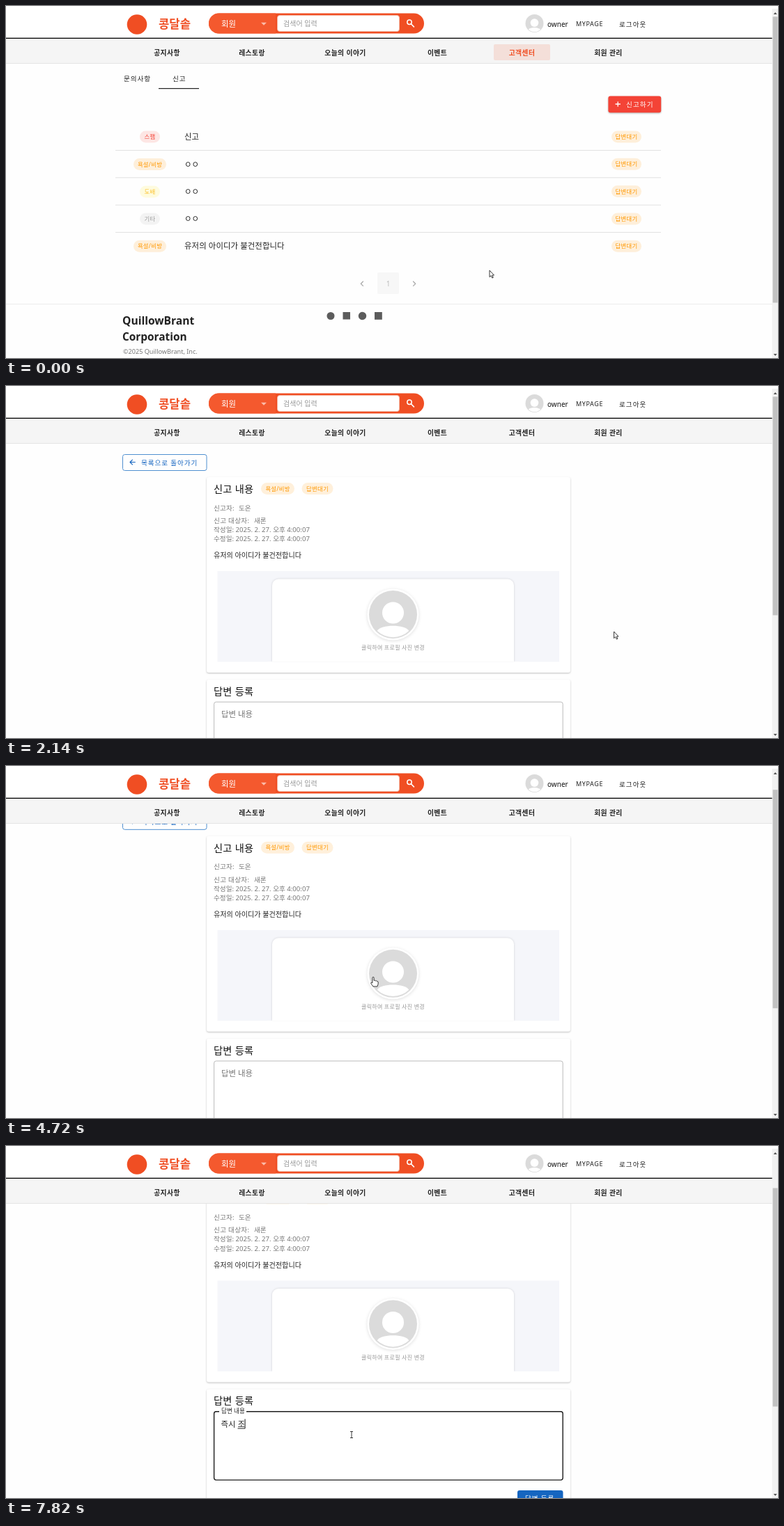
An HTML page that plays this animation: 1108 px wide and 506 px high, repeating every 8000 ms.

```html
<!DOCTYPE html>
<html lang="ko">
<head>
<meta charset="utf-8">
<title>신고 답변</title>
<style>
html, body { margin: 0; width: 100%; height: 100%; overflow: hidden; background: #fefefe; }
svg { display: block; width: 100vw; height: 100vh; }
text { font-family: "Noto Sans", "Noto Sans CJK KR", "Noto Sans CJK", sans-serif; white-space: pre; }
.b { font-weight: 700; }
.s { font-weight: 600; }
.m { font-weight: 500; }
.mid { text-anchor: middle; }
.card { fill: #fff; filter: drop-shadow(0 1px 1px rgba(0,0,0,.25)); }
.raised { filter: drop-shadow(0 1px 1.2px rgba(0,0,0,.3)); }
.line { fill: none; stroke-linecap: round; stroke-linejoin: round; }
</style>
</head>
<body>
<svg id="stage" viewBox="0 0 1108 506"></svg>
<script>
const ORANGE = '#f04e23', GREY = '#777', INK = '#222', BLUE = '#1565c0';
const LOOP = 8000, SCROLL = 72.5;

// Text is placed by its left edge and its optical middle.
const text = (x, cy, str, size, fill = INK, ls = 0, cls = '', id = '') =>
  `<text id="${id}" class="${cls}" x="${x}" y="${cy + size * .37}" font-size="${size}" fill="${fill}" letter-spacing="${ls}">${str}</text>`;
const rect = (x, y, w, h, fill, r = 0, more = '') =>
  `<rect x="${x}" y="${y}" width="${w}" height="${h}" rx="${r}" fill="${fill}" ${more}/>`;
const circle = (x, y, r, fill) => `<circle cx="${x}" cy="${y}" r="${r}" fill="${fill}"/>`;
const stroke = (d, color, w = 1.3) => `<path class="line" d="${d}" stroke="${color}" stroke-width="${w}"/>`;
const chip = (cx, cy, w, str, rgb, alpha, color) =>
  rect(cx - w / 2, cy - 8.5, w, 17, `rgba(${rgb},${alpha})`, 8.5) + text(cx, cy, str, 8.4, color, .25, 'mid');
const amber = (cx, cy, w, str) => chip(cx, cy, w, str, '255,152,0', .14, '#ff9800');
const avatar = (x, y, r) => `<g transform="translate(${x} ${y}) scale(${r})">${circle(0, 0, 1, '#dbdbdb')}
  ${circle(0, -.07, .45, '#fff')}<path fill="#fff" d="M-.66 .68C-.5 .4 .5 .4 .66 .68A.95 .95 0 0 1-.66 .68"/></g>`;

const nav = [[231, '공지사항'], [353, '레스토랑'], [487, '오늘의 이야기'], [619, '이벤트'], [740.5, '고객센터'], [864.5, '회원 관리']];
const navItem = ([x, str], color) => text(x, 67, str, 9.8, color, .4, 'b mid');

const header = () => rect(0, 0, 1100, 46, '#fff') + rect(0, 45.7, 1100, 1.4, '#000') +
  rect(0, 47, 1100, 35, '#f5f5f5') + rect(0, 82, 1100, 1, '#e4e4e4') +
  circle(188, 26.5, 14.3, ORANGE) + text(219, 25.5, '콩달솥', 16.7, ORANGE, 0, 'b') +
  rect(291, 10.5, 309, 29, ORANGE, 14.5) +
  '<path fill="#f4592e" d="M387 10.5H305.5a14.5 14.5 0 0 0 0 29H387Z"/>' +
  text(309, 25.5, '회원', 11.4, '#fff') + '<path fill="#fff" opacity=".6" d="M366 23.8h8l-4 4Z"/>' +
  rect(389.5, 13.5, 175, 23, '#fff', 3.5, 'stroke="#f3b9a6"') + text(398, 25.5, '검색어 입력', 10, '#999') +
  '<circle cx="579" cy="23.3" r="3.2" fill="none" stroke="#fff" stroke-width="1.5"/>' + stroke('M581.6 26l3.8 3.8', '#fff', 1.7) +
  avatar(758.5, 25, 13) + text(777, 26, 'owner', 10, '#111') +
  text(818, 26, 'MYPAGE', 9, INK, .6) + text(880, 26, '로그아웃', 9.5, INK, 1.1) +
  nav.map(n => navItem(n, INK)).join('') +
  `<g id="active">${rect(700, 55, 81, 23, '#f4dfd9', 2)}${navItem(nav[4], ORANGE)}</g>`;

const rows = [
  ['신고', chip(206.5, 188, 29, '스팸', '244,67,54', .13, '#f44336')],
  ['ㅇㅇ', amber(206.5, 227.5, 47, '욕설/비방')],
  ['ㅇㅇ', chip(206.5, 267, 29, '도배', '255,235,59', .16, '#fbc02d')],
  ['ㅇㅇ', chip(206.5, 306, 29, '기타', '0,0,0', .045, '#9e9e9e')],
  ['유저의 아이디가 불건전합니다', amber(206.5, 345.3, 47, '욕설/비방')]
];

const listPage = () => text(169, 104, '문의사항', 9.6, INK, .9) + text(239, 104, '신고', 9.6, INK, .9) +
  rect(219, 118, 58, 1.2, '#222') +
  rect(864.4, 129.4, 75.8, 23.8, '#f44336', 3, 'class="raised"') +
  stroke('M875 141h6.4M878.2 137.8v6.4', '#fff') + text(890, 141.5, '신고하기', 9.6, '#fff', 1.1) +
  rect(157, 325, 783, 39, '#ebebeb', 0, 'id="hover"') +
  rows.map(([title, tag], i) => {
    const y = 188 + i * 39.3;
    return tag + text(256, y, title, 11.4, INK, .1) + amber(890.5, y, 43, '답변대기') +
      (i < 4 ? rect(157, y + 19, 783, 1, '#e2e2e2') : '');
  }).join('') +
  stroke('M512.5 396l-3.2 3.2 3.2 3.2M584.5 396l3.2 3.2-3.2 3.2', '#aaa') +
  rect(533, 383, 31, 31, '#f7f7f7', 2) + text(548.5, 399.5, '1', 10, '#bbb', 0, 'mid') +
  rect(0, 428, 1100, 1, '#ececec') +
  text(167, 452, 'QuillowBrant', 15.6, INK, 0, 's') + text(167, 475, 'Corporation', 15.4, INK, 0, 's') +
  text(168, 497, '©2025 QuillowBrant, Inc.', 9.1, GREY) +
  circle(466, 445.5, 5.5, '#5c5c5c') + rect(483.5, 440, 10.5, 10.5, '#5c5c5c') +
  circle(511.5, 445.5, 5.7, '#5c5c5c') + rect(529, 440, 10.8, 10.8, '#5c5c5c');

const detailPage = () =>
  rect(167.5, 98.5, 120.5, 23, '#fefefe', 3, 'stroke="#4f8fd0"') +
  stroke('M185.3 109.5h-7.2M181.4 106.1l-3.4 3.4 3.4 3.4', BLUE, 1.2) + text(194, 110.5, '목록으로 돌아가기', 9.6, BLUE, .9) +
  rect(288, 131, 522, 281, '#fff', 3, 'class="card"') +
  text(298, 148, '신고 내용', 14.2, '#111', .3, 'm') + amber(390, 147.5, 48, '욕설/비방') + amber(447, 147.5, 45, '답변대기') +
  text(298, 175, '신고자:', 9.6, GREY, .2) + text(334, 175, '도온', 9.6, GREY) +
  text(298, 193.3, '신고 대상자:', 9.6, GREY, .3) + text(356, 193.3, '새론', 9.6, GREY) +
  text(298, 206.3, '작성일: 2025. 2. 27. 오후 4:00:07', 9.6, GREY) +
  text(298, 219.6, '수정일: 2025. 2. 27. 오후 4:00:07', 9.6, GREY) +
  text(298, 243.5, '유저의 아이디가 불건전합니다', 10.1) +
  rect(303.5, 266, 490.5, 130.5, '#f5f6fa') +
  '<path fill="#fff" style="filter:drop-shadow(0 0 1.5px rgba(0,0,0,.15))" d="M382 396.5V286.5a9 9 0 0 1 9-9H720a9 9 0 0 1 9 9V396.5Z"/>' +
  rect(375, 396.5, 362, 6, '#fff') +
  `<g style="filter:drop-shadow(0 1px 2px rgba(0,0,0,.13))">${circle(555.5, 328.5, 37, '#fff')}</g>` + avatar(555.5, 328.5, 34.5) +
  text(510, 376.5, '클릭하여 프로필 사진 변경', 8, '#999', .27) +
  rect(288, 422, 522, 190, '#fff', 3, 'class="card"') + text(298, 438.5, '답변 등록', 14.2, '#111', .3, 'm') +
  rect(298.6, 454.2, 500.6, 98.4, 'none', 3, 'id="area"') + rect(306, 452, 39, 4, '#fff', 0, 'id="notch"') +
  text(0, 0, '답변 내용', 11.4, GREY, 0, '', 'label') +
  text(308.5, 472, '', 11.3, INK, .1, '', 'typed') +
  rect(0, 478, 10.5, 1, INK, 0, 'id="under"') + rect(0, 465, 1, 13.5, '#111', 0, 'id="caret"') +
  rect(734, 567.5, 65.5, 24, BLUE, 3, 'id="send"') + text(745, 579, '답변 등록', 9.6, '#fff', .9);

const scrollbar = () => rect(1099.5, 4, 8.5, 502, '#f1f1f1') + rect(1100.5, 15.5, 7, 0, '#c1c1c1', 0, 'id="thumb"') +
  '<path fill="#555" d="M1101.6 12h5l-2.5-3ZM1101.6 500h5l-2.5 3Z"/>';

const shapes = {
  arrow: 'M0 0V9.6L2.2 7.6L3.8 11L5.3 10.3L3.8 7H6.5Z',
  hand: 'M-1 8.5V1.2Q-1 0 .1 0T1.2 1.2V5Q3 4.4 3.4 5.5Q5 5 5.4 6Q7.2 5.8 7.2 7.5V10L6 13.6H0L-3.3 9Q-3.4 7-1 8.5Z',
  beam: 'M-2-4.5H2M0-4.5V4.5M-2 4.5H2'
};

document.getElementById('stage').innerHTML = rect(0, 0, 1108, 506, '#fefefe') +
  `<g id="list">${listPage()}</g><g id="detail">${detailPage()}</g>${header()}${scrollbar()}` +
  '<path id="cursor" fill="#fff" stroke="#222" stroke-width=".9" stroke-linejoin="round"/>';

const $ = id => document.getElementById(id);
const set = (id, attrs) => { for (const k in attrs) $(id).setAttribute(k, attrs[k]); };
const show = (id, on) => { $(id).style.display = on ? '' : 'none'; };
const clamp = v => Math.max(0, Math.min(1, v));
const ease = v => { v = clamp(v); return v * v * (3 - 2 * v); };

// Cursor path: time, x, y
const path = [
  [200, 694, 380], [430, 800, 362], [660, 897, 338], [830, 895, 336], [1050, 875, 345], [1290, 904, 352],
  [1540, 891, 357], [1740, 892, 355], [2070, 892, 355], [2680, 725, 338], [2750, 706, 340], [2880, 700, 341],
  [3200, 600, 336], [3590, 521, 303], [3790, 521, 305], [3850, 524, 308], [3990, 526, 307], [4190, 527, 303],
  [4720, 527, 303], [4920, 511, 374], [5400, 496, 414], [5470, 496, 415]
];
function cursorAt(t) {
  const i = path.findIndex(p => p[0] > t);
  if (i < 0) return path[path.length - 1].slice(1);
  if (i === 0) return path[0].slice(1);
  const [t0, x0, y0] = path[i - 1], [t1, x1, y1] = path[i], k = (t - t0) / (t1 - t0);
  return [x0 + (x1 - x0) * k, y0 + (y1 - y0) * k];
}

const typing = [[6810, 'ㅈ'], [7010, '즈'], [7280, '즉'], [7420, '즉시'], [7550, '즉시 '], [7680, '즉시 ㅈ'], [7820, '즉시 조']];

function draw(t) {
  const isList = t < 2070;
  const scroll = SCROLL * ease((t - 4650) / 160);
  const [x, y] = cursorAt(t);
  const overRow = isList && y > 325 && y < 364;
  const overImage = !isList && x > 303 && x < 794 && y > 266 - scroll && y < 396 - scroll;
  const overArea = !isList && y > 454 - scroll;

  show('list', isList);
  show('active', isList);
  show('detail', !isList);
  show('hover', overRow);
  set('detail', { transform: `translate(0 ${-scroll})` });
  set('thumb', { y: 15.5 + scroll * 45 / SCROLL, height: isList ? 411 : 314 });
  set('cursor', { d: shapes[overArea ? 'beam' : overRow || overImage ? 'hand' : 'arrow'], transform: `translate(${x} ${y})` });

  const focus = ease((t - 5470) / 220), focused = t >= 5470;
  set('area', { stroke: overArea ? '#1c1c1c' : '#bbb', 'stroke-width': focused ? 1.4 : 1 });
  set('notch', { width: 39 * focus });
  set('label', {
    transform: `translate(309 ${472 - 18.2 * focus}) scale(${1 - .245 * focus})`,
    fill: focused ? INK : GREY
  });

  const word = typing.reduce((last, [at, str]) => t >= at ? str : last, '');
  $('typed').textContent = word;
  const end = 308.5 + (word ? $('typed').getComputedTextLength() : 0);
  set('under', { x: end - 10.5 });
  set('caret', { x: end - .5 });
  show('under', word && !word.endsWith(' '));
  show('caret', focused && (t < 5790 || t >= 6340));
  $('send').style.fill = `color-mix(in srgb, ${BLUE} ${100 * clamp((t - 6810) / 250)}%, #82abdd)`;
}

const start = performance.now();
function tick() {
  draw((performance.now() - start) % LOOP);
  requestAnimationFrame(tick);
}
tick();
</script>
</body>
</html>
```
